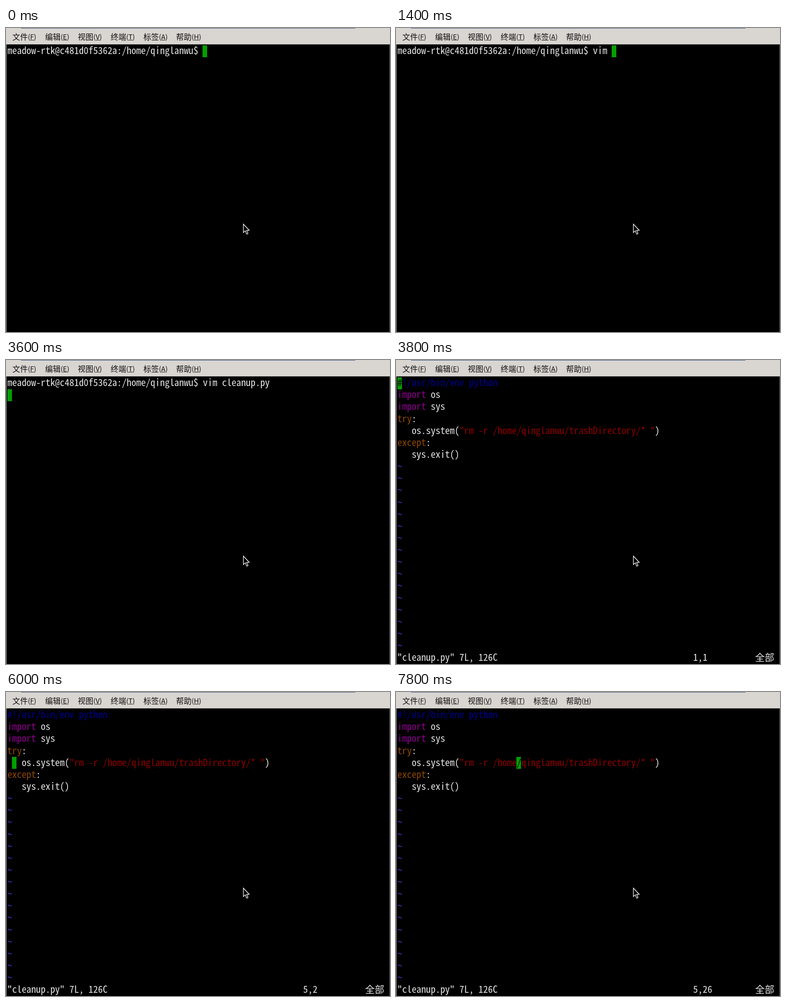
An HTML page with a canvas that plays this animation: 842x665 px, repeating every 8000 ms.

```html
<!DOCTYPE html>
<html lang="zh-CN">
<head>
<meta charset="utf-8">
<title>Terminal</title>
<style>
html, body { margin: 0; width: 100%; height: 100%; overflow: hidden; background: #000; }
canvas { display: block; }
</style>
</head>
<body>
<canvas id="stage" width="842" height="665"></canvas>
<script>
const ctx = document.getElementById('stage').getContext('2d');
const LOOP = 8000, LEFT = 3, TOP = 37.6, CELL_W = 10.46, CELL_H = 26.13;
const TEXT = '#e6e6e6', GREEN = '#00a000', BLUE = '#00008e', PURPLE = '#8e008e',
      BROWN = '#8e4700', RED = '#8e0000', TILDE = '#3c3cd8';
const MONO = '20.92px "Noto Sans Mono CJK SC", "Noto Sans Mono CJK JP", monospace';
const SANS = '"Noto Sans CJK SC", "Noto Sans CJK JP", sans-serif';

const PROMPT = 'meadow-rtk@c481d0f5362a:/home/qinglanwu$ ';
const MENU = ['文件F', '编辑E', '视图V', '终端T', '标签A', '帮助H'];
const CODE = [
  [[BLUE, '#!/usr/bin/env python']],
  [[PURPLE, 'import'], [TEXT, ' os']],
  [[PURPLE, 'import'], [TEXT, ' sys']],
  [[BROWN, 'try'], [TEXT, ':']],
  [[TEXT, '   os.system('], [RED, '"rm -r /home/qinglanwu/trashDirectory/* "'], [TEXT, ')']],
  [[BROWN, 'except'], [TEXT, ':']],
  [[TEXT, '   sys.exit()']]
];

// Each entry: start time, then the state that holds from there on.
const TYPED = [[0, ''], [400, 'v'], [800, 'vi'], [1000, 'vim'], [1400, 'vim '],
  [1600, 'vim c'], [1800, 'vim cl'], [2000, 'vim cle'], [2200, 'vim clea'],
  [2400, 'vim clean'], [2800, 'vim cleanup.py ']];
const LINE_AT = [[0, 1], [4600, 2], [5200, 3], [5400, 4], [5600, 5]];
const ENTER = 3600, VIM_OPEN = 3800;

const at = (steps, t) => steps.filter(([start]) => start <= t).pop()[1];

function columnAt(t) {
  if (t < 6000) return 1;
  const step = Math.floor((t - 6000) / 200);
  return step < 2 ? 2 + step : 3 * step - 1;
}

function rect(color, x, y, w, h) {
  ctx.fillStyle = color;
  ctx.fillRect(x, y, w, h);
}

function write(text, col, row, color = TEXT) {
  ctx.font = MONO;
  ctx.fillStyle = color;
  for (const char of text) {
    ctx.fillText(char, LEFT + col * CELL_W, TOP + row * CELL_H + 19.6);
    col += char > '\u2e80' ? 2 : 1;
  }
  return col;
}

function block(col, row, char = '') {
  rect(GREEN, Math.round(LEFT + col * CELL_W - 0.5), Math.round(TOP + row * CELL_H), 10, 26);
  write(char, col, row, '#000');
}

function drawWindow() {
  rect('#000', 0, 0, 842, 665);
  rect('#d9d5d1', 0, 0, 842, 36);
  rect('#b9b5b1', 0, 35, 842, 1);
  rect('#35587f', 33, 0, 733, 1);
  rect('#c8c4c0', 0, 36, 1, 629);
  rect('#77736f', 841, 36, 1, 629);
  MENU.forEach((item, i) => {
    const x = 14 + i * 71.8, key = item[2];
    ctx.fillStyle = '#111';
    ctx.font = '17px ' + SANS;
    ctx.fillText(item.slice(0, 2), x, 25.5);
    ctx.font = '15px ' + SANS;
    ctx.fillText(`(${key})`, x + 34, 25);
    rect('#111', x + 34 + ctx.measureText('(').width, 26, ctx.measureText(key).width, 1);
  });
}

function drawShell(t) {
  const entered = t >= ENTER;
  const end = write(PROMPT + at(TYPED, t), 0, 0);
  block(entered ? 0 : end, entered ? 1 : 0);
}

function drawVim(t) {
  CODE.forEach((parts, row) =>
    parts.reduce((col, [color, text]) => write(text, col, row, color), 0));
  for (let row = CODE.length; row < 23; row++) write('~', 0, row, TILDE);
  const line = at(LINE_AT, t), column = columnAt(t);
  write('"cleanup.py" 7L, 126C', 0, 23);
  write(`${line},${column}`, 62, 23);
  write('全部', 75, 23);
  const source = CODE[line - 1].map(part => part[1]).join('');
  block(column - 1, line - 1, source[column - 1]);
}

const arrow = new Path2D('M520.5 429V447.5L524.7 443.6L527.6 450.6Q529.3 451.4 530.6 449.4L527.7 442.7H533.4Z');

function drawPointer() {
  ctx.fillStyle = '#000';
  ctx.fill(arrow);
  ctx.strokeStyle = '#fff';
  ctx.lineWidth = 1.3;
  ctx.stroke(arrow);
}

function frame(now) {
  const t = now % LOOP;
  drawWindow();
  (t < VIM_OPEN ? drawShell : drawVim)(t);
  drawPointer();
  requestAnimationFrame(frame);
}
frame(0);
</script>
</body>
</html>
```
